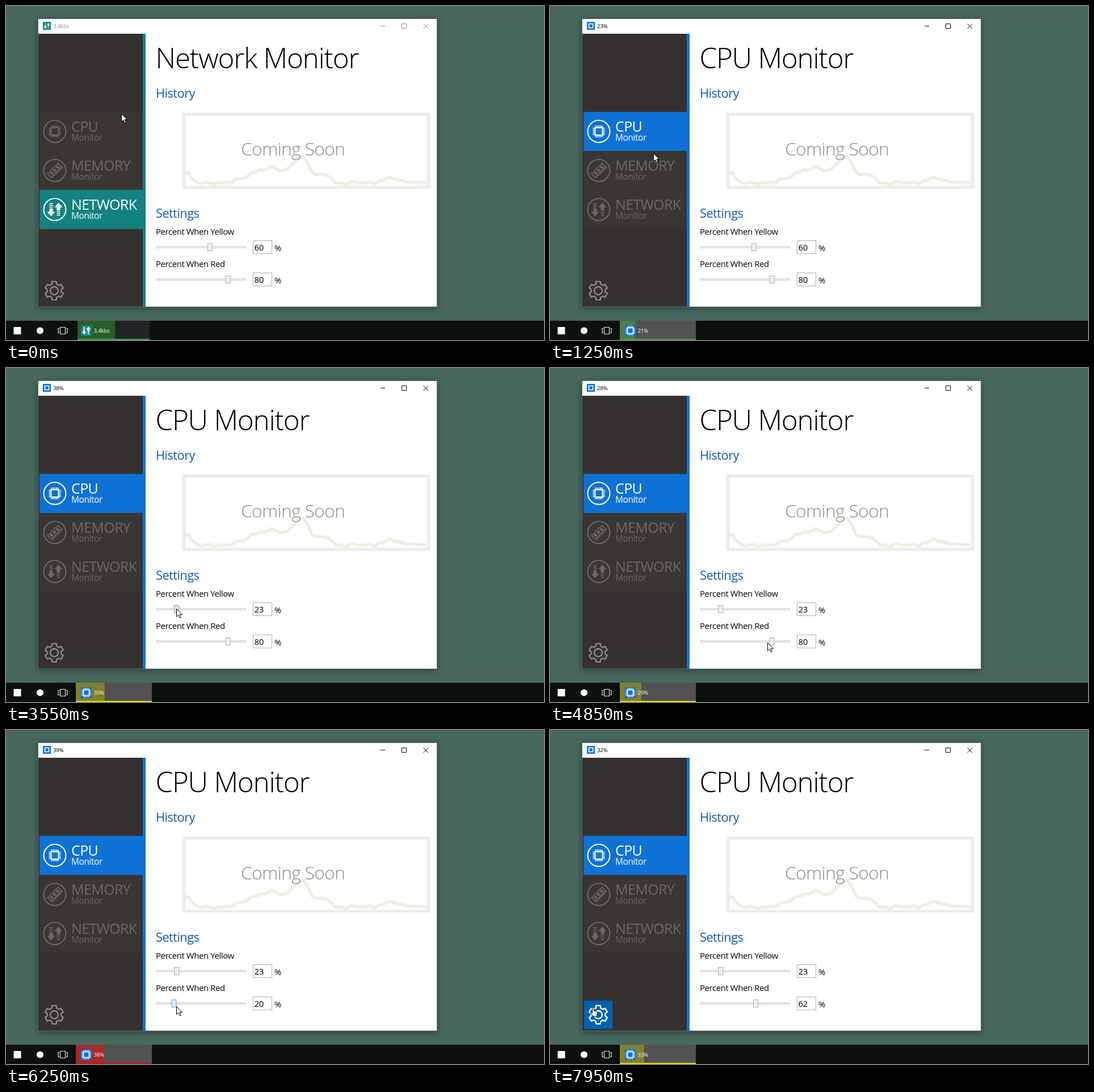
Animation of 948 by 590 pixels, one loop 8 s. Source, as an HTML page:

```html
<!DOCTYPE html>
<html lang="en">
<head>
<meta charset="utf-8">
<title>System monitor</title>
<style>
html, body { margin: 0; width: 948px; height: 590px; overflow: hidden; background: #48685f; }
svg { display: block; }
text { font-family: "Open Sans", "Noto Sans", sans-serif; letter-spacing: -.025em; }
.light { font-weight: 300; }
.head { font-size: 21.8px; fill: #0b5cad; }
.body { font-size: 14.9px; }
.small { font-size: 9.8px; }
.win { filter: drop-shadow(0 2px 6px rgba(0, 0, 0, .4)); }
.line { fill: none; stroke: currentColor; }
.solid { fill: currentColor; }
</style>
</head>
<body>
<svg width="948" height="590" viewBox="0 0 948 590">
  <defs>
    <clipPath id="pane"><path d="M246 49H759V531H246Z"/></clipPath>
    <filter id="blur"><feGaussianBlur stdDeviation="1.5"/></filter>
    <g id="chip">
      <rect class="line" x="-6.5" y="-6.5" width="13" height="13" stroke-width="2"/>
      <path class="line" stroke-width="3" stroke-dasharray="1.6 1.25" d="M-6.5-9H6.5M-6.5 9H6.5M-9-6.5V6.5M9-6.5V6.5"/>
    </g>
    <g id="ram" transform="rotate(-45)">
      <rect class="line" x="-13" y="-5" width="26" height="9" stroke-width="1.8"/>
      <path class="line" stroke-width="4.5" stroke-dasharray="5 2.5" d="M-10-.5H10"/>
      <path class="line" stroke-width="2.5" stroke-dasharray="1.8 1.2" d="M-13 5.8H13"/>
    </g>
    <g id="down">
      <path class="line" stroke-width="6" stroke-dasharray="1.6 1.4" d="M-6.5-11V-2"/>
      <path class="solid" d="M-9.5-2h6V4h4L-6.5 12-13.5 4h4z"/>
    </g>
    <g id="net"><use href="#down"/><use href="#down" transform="rotate(180)"/></g>
  </defs>

  <rect width="948" height="590" fill="#48685f"/>
  <rect class="win" x="56.5" y="22.5" width="703" height="509" fill="#fff" stroke="#5c6e69"/>
  <path fill="#353130" d="M57 49H241V531H57Z"/>
  <rect id="strip" x="241" y="49" width="5" height="482"/>

  <g id="bar">
    <rect id="badge" x="65" y="28" width="14" height="14"/>
    <g id="badgeIcon" color="#fff"></g>
    <text id="title" class="small" x="83" y="39" fill="currentColor"></text>
    <path class="line" d="M660 35.5h8M697.5 31.5h8v8h-8zM735.5 31.5l8.5 8.5M744 31.5l-8.5 8.5"/>
  </g>

  <g id="menu"></g>

  <rect id="gearBox" x="60" y="478" width="50" height="50" fill="#0063b1"/>
  <g id="gear" transform="translate(85 503)" class="line" stroke-width="2.4" stroke-linejoin="round">
    <path id="cog"/><circle r="7"/>
  </g>

  <g clip-path="url(#pane)"><g id="page">
    <text id="heading" class="light" x="263.5" y="110" font-size="49.4"></text>
    <text class="head" x="264" y="162">History</text>
    <g filter="url(#blur)" fill="none">
      <rect x="313.5" y="191" width="431" height="129.5" stroke="#e4e4e4" stroke-width="4"/>
      <path id="chart" stroke="#dfecd3" stroke-width="4" stroke-linejoin="round"/>
    </g>
    <text class="light" x="414" y="264" font-size="32" fill="#8c8c8c">Coming Soon</text>
    <text class="head" x="264" y="374">Settings</text>
    <g id="sliders"></g>
  </g></g>

  <path fill="#0c100f" d="M0 556H948V590H0Z"/>
  <rect x="13.5" y="567" width="13" height="13" fill="#fff"/>
  <circle cx="60" cy="573.5" r="6" fill="#fff"/>
  <path class="line" color="#e8e8e8" stroke-width="1.2" d="M95.5 567.5h9v12h-9zM94 569.5h-2v8h2M106 569.5h2v8h-2"/>
  <rect id="button" y="556" height="34"/>
  <rect id="progress" y="556" height="34"/>
  <rect id="underline" y="588" height="2"/>
  <rect id="tile" x="132" y="564" width="19" height="19"/>
  <g id="tileIcon" color="#fff"></g>
  <text id="label" class="small" x="154.5" y="577" fill="#fff"></text>

  <path id="arrow" d="M.5.5V14.5L3.7 11.5 6 16.6 8.3 15.6 6 10.7H10.5Z" fill="#fff" stroke="#000"/>
  <path id="hand" d="M3.5 1.5q1.5-2 3 0V7l5 1.2q1.5.5 1.200 2.500L11.5 17H5L1 11.5q-1-2 .8-2l1.700 1.500Z" fill="#fff" stroke="#000"/>
</svg>
<script>
const $ = id => document.getElementById(id);
const set = (id, attrs) => { for (const k in attrs) $(id).setAttribute(k, attrs[k]); };
const LOOP = 8000, CLICK = 550, LAG = 100;
const TEAL = '#138280', BLUE = '#0e71d6', GREEN = '#41a83e';

// Eased progress from 0 to 1 between two times
function glide(t, from, to) {
  const p = Math.min(1, Math.max(0, (t - from) / (to - from)));
  return p * p * (3 - 2 * p);
}

const YELLOW_DOWN = [2100, 3500], RED_DOWN = [5350, 6200], RED_UP = [6270, 7120];
const yellowAt = t => 60 - 37 * glide(t, ...YELLOW_DOWN);
const redAt = t => 80 - 60 * glide(t, ...RED_DOWN) + 42 * glide(t, ...RED_UP);
const loadAt = t => 14 + 30 * glide(t, 700, 2200) - 16 * glide(t, 2500, 5050)
  + 11 * glide(t, 5050, 6350) - 9.4 * glide(t, 6600, 8600);

// Pointer moves: start, end, then where it arrives
const moves = [
  [0, 450, 129, 210],
  [1000, 1800, 354, 423],
  [...YELLOW_DOWN, 300, 425],
  [3700, 4800, 383, 485],
  [4900, 5250, 395, 488],
  [...RED_DOWN, 300, 488],
  [...RED_UP, 366, 488],
  [7200, 7920, 71, 489]
];
const pointerAt = t => moves.reduce(([x, y], [from, to, toX, toY]) => {
  const p = glide(t, from, to);
  return [x + (toX - x) * p, y + (toY - y) * p];
}, [203, 190]);

const items = [['CPU', 'chip', BLUE], ['MEMORY', 'ram', BLUE], ['NETWORK', 'net', TEAL]];
$('menu').innerHTML = items.map(([name, icon], i) => `
  <g id="item${i}" transform="translate(0 ${i * 69})">
    <rect id="back${i}" x="59" y="187" width="182" height="69"/>
    <g transform="translate(86 221.5)">
      <circle class="line" r="19.5" stroke-width="2"/><use href="#${icon}"/>
    </g>
    <text class="solid" x="115" y="222" font-size="25">${name}</text>
    <text class="solid" x="115" y="238" font-size="15.4">Monitor</text>
  </g>`).join('');

$('sliders').innerHTML = ['Yellow', 'Red'].map((name, i) => `
  <g class="body" transform="translate(0 ${i * 57})">
    <text x="264" y="404">Percent When ${name}</text>
    <rect x="264.5" y="424.5" width="158" height="3" fill="#e7eaea" stroke="#d6d6d6"/>
    <rect id="thumb${i}" y="419.5" width="8" height="13"/>
    <rect x="435.5" y="414.5" width="33" height="23" fill="#fff" stroke="#abadb3"/>
    <text id="value${i}" x="437.5" y="432"></text>
    <text x="473" y="433">%</text>
  </g>`).join('');

function gearPath() {
  const points = [];
  for (let tooth = -90; tooth < 270; tooth += 60)
    for (const [r, turn] of [[12.5, -20], [16.5, -13], [16.5, 13], [12.5, 20]]) {
      const a = (tooth + turn) * Math.PI / 180;
      points.push([r * Math.cos(a), r * Math.sin(a)]);
    }
  return `M${points.join('L')}Z`;
}
set('cog', { d: gearPath() });

// A low jittery line with a few hills
function chartPath() {
  let seed = 7;
  const random = () => (seed = seed * 16807 % 2147483647) / 2147483647;
  const points = [];
  for (let x = 314; x <= 744; x += 7) {
    const hill = (at, width, height) => height * Math.exp(-(((x - at) / width) ** 2));
    const rise = hill(320, 7, 22) + hill(465, 45, 27) + hill(521, 20, 42)
      + hill(562, 14, 13) + hill(680, 14, 11);
    points.push([x, 309 - rise + 7 * random()]);
  }
  return `M${points.join('L')}`;
}
set('chart', { d: chartPath() });

function showIcons(cpu) {
  $('badgeIcon').innerHTML = cpu
    ? '<rect class="line" x="68.5" y="31.5" width="7" height="7" stroke-width="1.6"/>'
    : '<use href="#net" transform="translate(72 35) scale(.42)"/>';
  $('tileIcon').innerHTML =
    `<use href="#${cpu ? 'chip' : 'net'}" transform="translate(141.5 573.5) scale(${cpu ? .76 : .58})"/>`;
}

function showSlider(i, value, hot) {
  value = Math.round(value);
  set('thumb' + i, {
    x: 260.3 + 1.583 * value,
    fill: hot ? '#d6ebfb' : '#f0f0f0', stroke: hot ? '#5aa5e2' : '#acacac'
  });
  $('value' + i).textContent = value;
}

let wasCpu = null;
function draw(t) {
  const cpu = t >= CLICK, accent = cpu ? BLUE : TEAL, active = cpu ? 0 : 2;
  if (cpu !== wasCpu) showIcons(wasCpu = cpu);

  for (const id of ['strip', 'badge', 'tile']) set(id, { fill: accent });
  items.forEach((item, i) => {
    set('item' + i, { color: i === active ? '#fff' : '#6b6866' });
    set('back' + i, { fill: i === active ? item[2] : '#393634' });
  });
  set('bar', { color: cpu ? '#000' : '#8c8c8c' });
  $('heading').textContent = (cpu ? 'CPU' : 'Network') + ' Monitor';

  // The new page slides in from the right while it fades in
  const rest = cpu ? Math.max(0, 1 - (t - CLICK) / 350) ** 2 : 0;
  set('page', { opacity: 1 - rest, transform: `translate(${30 * rest} 0)` });

  const yellow = yellowAt(t), red = redAt(t);
  showSlider(0, yellow, t > 1800 && t < 3780);
  showSlider(1, red, t > 5100 && t < 7240);

  // The taskbar trails the window title slightly
  const load = Math.round(loadAt(t)), late = Math.round(loadAt(t - LAG));
  $('title').textContent = cpu ? load + '%' : '3.4kbs';
  $('label').textContent = cpu ? late + '%' : '3.4kbs';
  const [fill, edge] = !cpu ? ['#2b5c2b', GREEN]
    : late >= red ? ['#a82a28', '#c8150f']
    : late >= yellow ? ['#83802f', '#e6d800']
    : ['#4a7f48', GREEN];
  const x = cpu ? 123 : 126, width = cpu ? 134 : 127;
  set('button', { x, width, fill: cpu ? '#525252' : '#212426' });
  set('progress', { x, width: cpu ? 1.3 * late : 66, fill });
  set('underline', { x, width, fill: edge });

  const hover = t >= 7940;
  set('gearBox', { visibility: hover ? 'visible' : 'hidden' });
  set('gear', { color: hover ? '#fff' : '#8d8a89' });
  const transform = `translate(${pointerAt(t).map(Math.round).join(' ')})`;
  set('arrow', { transform, visibility: hover ? 'hidden' : 'visible' });
  set('hand', { transform, visibility: hover ? 'visible' : 'hidden' });
}

const start = performance.now();
function frame() {
  draw((performance.now() - start) % LOOP);
  requestAnimationFrame(frame);
}
frame();
</script>
</body>
</html>
```
